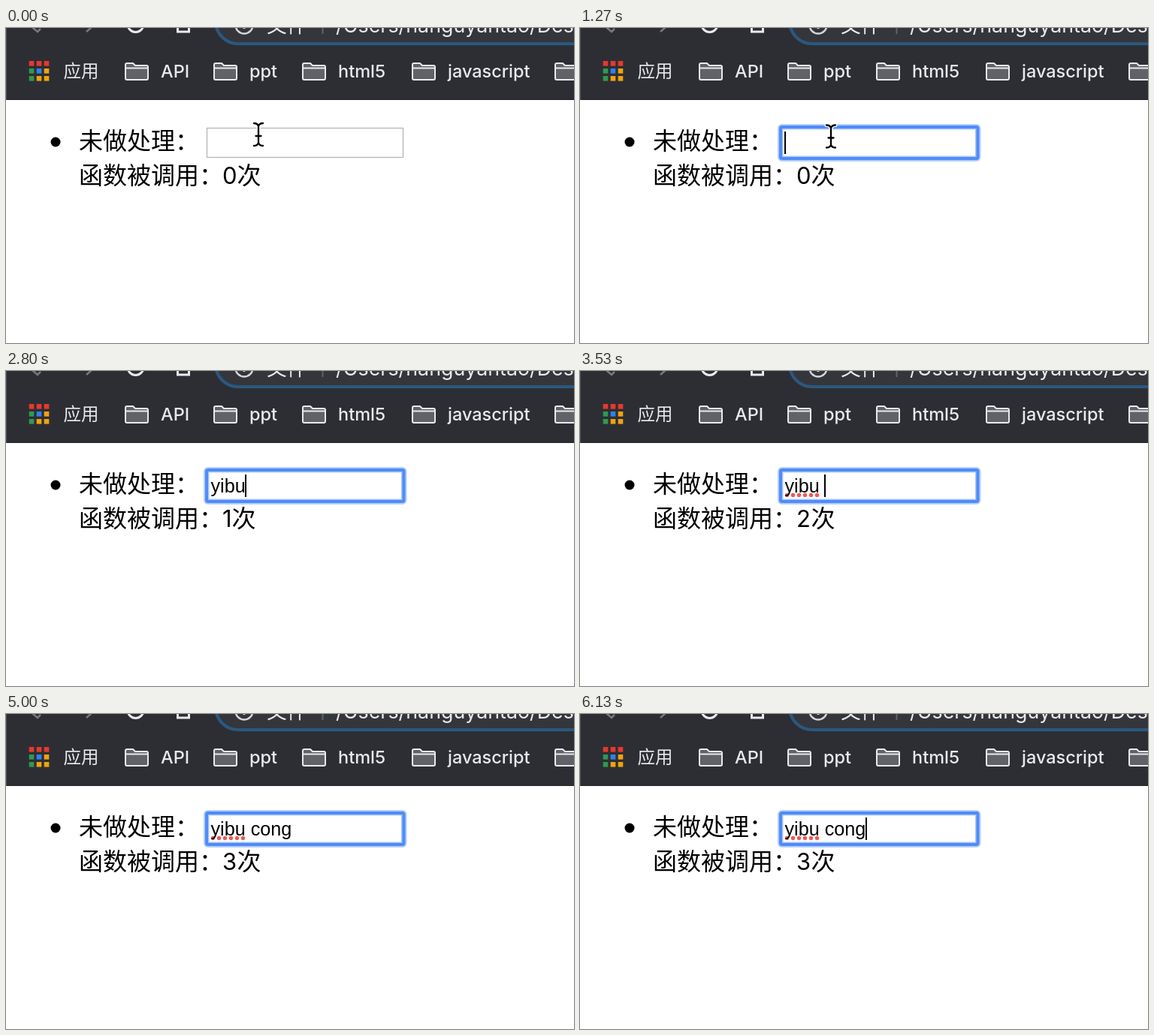
An HTML page for the animation above (6190 ms loop, 756 px wide and 420 px high).

```html
<!DOCTYPE html>
<html lang="zh-CN">
<head>
<meta charset="utf-8">
<style>
html, body { margin: 0; width: 100%; height: 100%; overflow: hidden; background: #fff; }
svg { display: block; width: 100vw; height: 100vh; }
text { white-space: pre; }
.bar { font: 500 23.5px Inter, "Noto Sans CJK SC", sans-serif; fill: #e8eaed; }
.url { font-size: 26.8px; font-weight: 400; }
.page { font: 500 32px "Noto Sans CJK SC", sans-serif; }
.digit { font: 31px Inter, sans-serif; }
.field { font: 25.2px "Liberation Sans", Arial, sans-serif; }
</style>
</head>
<body>
<svg viewBox="0 0 756 420">
  <defs>
    <g id="folder" stroke="#e8eaed" stroke-width="2" stroke-linejoin="round">
      <path d="M1 3q0-2 2-2h8l3 3h15q2 0 2 2v15q0 2-2 2h-26q-2 0-2-2z" fill="#606267"/>
      <path d="M1 7.500h30" fill="none"/>
    </g>
    <path id="beam" d="M-6-15q5 0 6 4q1-4 6-4M0-11v22M-6 15q5 0 6-4q1 4 6 4M-3.500 2h7"/>
  </defs>
  <rect width="756" height="420" fill="#fff"/>

  <rect width="756" height="96" fill="#2d2e33"/>
  <rect y="95" width="756" height="1" fill="#222327"/>
  <rect width="1" height="96" fill="#505156"/>
  <g fill="none" stroke="#e8eaed" stroke-width="3">
    <path d="M35-1l7 6 4-4" stroke="#77797e" stroke-width="2.500"/>
    <path d="M107 5l8-7" stroke="#77797e" stroke-width="2.500"/>
    <circle cx="172.500" cy="-5" r="10.500"/>
    <path d="M228.500-6v11h15v-11"/>
  </g>
  <rect x="279" y="-40" width="620" height="61" rx="30" fill="#34363b" stroke="#2a5880" stroke-width="4"/>
  <circle cx="317" cy="-4" r="11.500" fill="none" stroke="#d4d6d9" stroke-width="2.500"/>
  <path d="M317-6v7" stroke="#d4d6d9" stroke-width="3"/>
  <text class="bar url" x="347" y="6">文件</text>
  <path d="M421.500-10v18" stroke="#5f6368" stroke-width="2"/>
  <text class="bar url" x="439" y="6">/Users/hanguyantao/Desktop</text>

  <g id="apps"></g>
  <g id="marks"></g>

  <circle cx="66" cy="152" r="6.500"/>
  <text class="page" x="97" y="162">未做处理：</text>
  <text class="page" x="97" y="208">函数被调用：</text>
  <text class="digit" id="count" x="288" y="208"></text>
  <text class="page" id="unit" y="208">次</text>

  <rect id="plain" x="267.500" y="133.500" width="261" height="39" fill="#fff" stroke="#b5b5b5" stroke-width="1.300"/>
  <g id="ring">
    <rect x="263" y="128" width="270.500" height="50" rx="6" fill="#b5cefb"/>
    <rect x="265" y="130" width="266.500" height="46" rx="4" fill="#4f8bf7"/>
    <rect x="269" y="134" width="258.500" height="38" fill="#a9c7f9"/>
    <rect x="270.500" y="135.500" width="255.500" height="35" fill="#fff"/>
  </g>
  <g id="dots" fill="#ee5a52"></g>
  <text class="field" id="value" x="272.500" y="162"></text>
  <rect id="caret" y="138" width="2" height="30"/>
  <g id="mouse" fill="none" stroke-linecap="round">
    <use href="#beam" stroke="#fff" stroke-width="5"/>
    <use href="#beam" stroke="#000" stroke-width="2.300"/>
  </g>
</svg>
<script>
const LOOP = 6190;
const $ = id => document.getElementById(id);
const range = n => [...Array(n).keys()];

const [R, G, B, Y] = ['#e8382e', '#2f9a50', '#2f80ed', '#f0a30f'];
$('apps').innerHTML = [R, R, R, G, B, Y, G, Y, Y].map((c, i) =>
  `<rect x="${30.7 + i % 3 * 10}" y="${44 + Math.floor(i / 3) * 10}" width="6.600" height="6.600" fill="${c}"/>`).join('');

const label = (x, s) => `<text class="bar" x="${x}" y="66">${s}</text>`;
const folder = (x, s) => `<use href="#folder" x="${x}" y="46"/>` + label(x + 48, s);
$('marks').innerHTML = label(76.5, '应用') + folder(158, 'API') + folder(276, 'ppt') +
  folder(394, 'html5') + folder(540, 'javascript') + folder(730, '');

$('dots').innerHTML = range(6).map(i => `<circle cx="${275.5 + i * 8}" cy="165.500" r="2.700"/>`).join('');

// Each track is a list of [start, value] with hard changes.
const typed = [[0, ''], [1330, 'y'], [1400, 'yi'], [1600, 'yib'], [1670, 'yibu'], [1800, 'yibuc'],
  [2400, 'yibu'], [3200, 'yibu '], [3670, 'yibu c'], [3870, 'yibu co'], [4000, 'yibu con'], [4130, 'yibu cong']];
const caretOn = [[0, 0], [200, 1], [730, 0], [1270, 1], [2330, 0], [2800, 1],
  [4600, 0], [5130, 1], [5600, 0], [6070, 1]];
const calls = [[0, 0], [2470, 1], [3270, 2], [4670, 3]];
const mouse = [[0, [336, 142]], [70, [335, 143]], [130, [334, 144.5]]];
const at = (track, t) => track.filter(k => k[0] <= t).pop()[1];

const pen = document.createElement('canvas').getContext('2d');
pen.font = '25.2px "Liberation Sans", Arial, sans-serif';
const show = (id, on) => $(id).setAttribute('visibility', on ? 'visible' : 'hidden');

function draw(t) {
  const text = at(typed, t), n = at(calls, t);
  $('value').textContent = text;
  $('caret').setAttribute('x', 272 + Math.round(pen.measureText(text).width));
  $('count').textContent = n;
  $('unit').setAttribute('x', n === 1 ? 300.5 : 307.5);
  $('mouse').setAttribute('transform', `translate(${at(mouse, t)})`);
  show('plain', t < 200);
  show('ring', t >= 200);
  show('caret', at(caretOn, t));
  show('dots', t >= 3530);
  show('mouse', t < 1330);
}

const start = performance.now();
function tick() {
  draw((performance.now() - start) % LOOP);
  requestAnimationFrame(tick);
}
tick();
</script>
</body>
</html>
```
